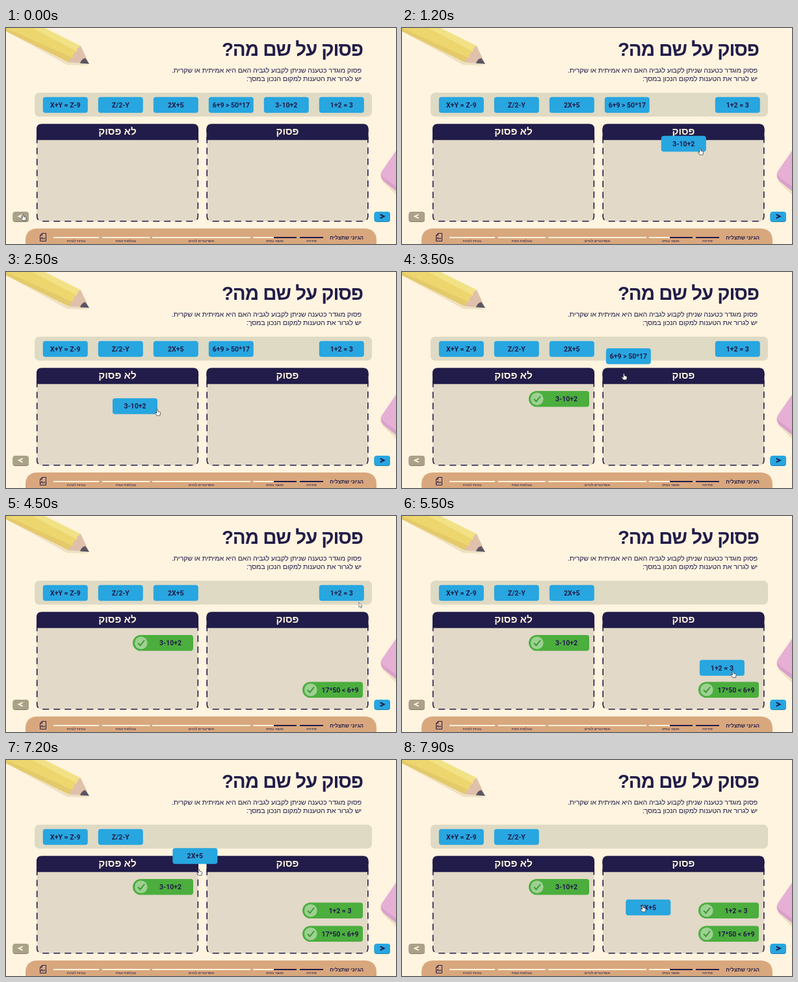
An HTML page for the animation above (8000 ms loop, 600 by 334 pixels).

```html
<!DOCTYPE html>
<html lang="he">
<head>
<meta charset="utf-8">
<title>פסוק על שם מה?</title>
<style>
  html, body { margin: 0; width: 100%; height: 100%; overflow: hidden; background: #fff4df; }
  svg { display: block; width: 100vw; height: 100vh; }
  text { fill: #211c49; font-family: "Liberation Sans", Arial, sans-serif; direction: rtl; }
  .mid { text-anchor: middle; }
  .title { font-size: 29.5px; font-weight: 700; letter-spacing: -1.07px; }
  .para { font-size: 10.8px; letter-spacing: -.17px; }
  .head { font-size: 15.2px; font-weight: 700; fill: #fff4df; }
  .course { font-size: 8px; font-weight: 700; }
  .step { font-size: 5.6px; }
  .sum { font: 600 10.5px Roboto, "Open Sans", sans-serif; direction: ltr; text-anchor: middle; }
  .icon { font-size: 6px; }
  .bar { stroke: #fff4df; stroke-width: 2.2; }
  .dark { stroke: #211c49; }
</style>
</head>
<body>
<svg viewBox="0 0 600 334" preserveAspectRatio="none">
  <rect width="600" height="334" fill="#fff4df"/>

  <!-- pencil -->
  <path d="M0 5L94 57L126 58L100 43L0 0Z" fill="#eee0c3"/>
  <path d="M0 0H59L115 28L97 53L0 5Z" fill="#edd66e"/>
  <path d="M40 0H59L115 28L109 36Z" fill="#f2e285"/>
  <path d="M0 0L102 46L97 53L0 5Z" fill="#e4ca6a"/>
  <path d="M115 28L128 55.500L97 53Q98 47 103 45Q104 38 109 36Q109 30 115 28Z" fill="#dfc1ab"/>
  <path d="M122 46.500L128 55.500L114 54.500Q116 48 122 46.500Z" fill="#5b5662"/>

  <!-- eraser -->
  <path d="M600 196L579 228Q576 236 583 241L600 258Z" fill="#eee0c3"/>
  <path d="M600 190L578 222Q574 230 581 237L600 252Z" fill="#d9a0cc"/>
  <path d="M600 190L579 221Q575 227 581 231L600 245Z" fill="#e6b0d5"/>

  <text class="title" x="549" y="42.500">פסוק על שם מה?</text>
  <text class="para" x="547" y="69">פסוק מוגדר כטענה שניתן לקבוע לגביה האם היא אמיתית או שקרית.</text>
  <text class="para" x="547" y="81.500">יש לגרור את הטענות למקום הנכון במסך:</text>

  <rect x="44" y="100" width="519" height="37" rx="7" fill="#dfdac4"/>
  <path d="M30 334V329Q30 310 49 310H551Q570 310 570 329V334Z" fill="#d9a77d"/>
  <text class="course" x="550" y="326.500">הגיוני שתצליח</text>
  <path d="M55.500 317.500H61.500V329.500H52.500V320.500ZV320.500H52.500" fill="none" stroke="#211c49"/>
  <text x="57" y="327" class="sum icon">A+</text>

  <g id="scene"></g>
  <g id="chips"></g>
  <g id="cursor">
    <path id="hand" d="M-1.800 -4.500Q-.8 -5.500 0 -4.400L.3 -1.500L3 -.8Q4.200 -.4 4.100 .8L3.400 4.800H-1.300L-4 1.200Q-4 -.1 -2.600 .4L-1.500 1.300Z" fill="#fff" stroke="#39363f" stroke-width=".8"/>
    <path id="pointer" d="M-2 -4.500V3.200L-.2 1.600L1 4.300L2.200 3.700L1.100 1.200H3.300Z" fill="#fff" stroke="#55525a" stroke-width=".7"/>
  </g>
</svg>
<script>
const LOOP = 8000, TICK = 100, LAG = 100;
const INK = '#211c49', CREAM = '#fff4df', BLUE = '#27a6e0';
const $ = id => document.getElementById(id);

function add(parent, tag, attrs, text) {
  const el = document.createElementNS('http://www.w3.org/2000/svg', tag);
  for (const k in attrs) el.setAttribute(k, attrs[k]);
  if (text) el.textContent = text;
  return parent.appendChild(el);
}
function place(el, x, y) { el.setAttribute('transform', `translate(${x} ${y})`); }
function show(el, on) { el.setAttribute('visibility', on ? 'visible' : 'hidden'); }
function group(parent, x, y) {
  const g = add(parent, 'g', {});
  place(g, x, y);
  return g;
}

function panel(x, label) {
  const g = group($('scene'), x, 148.3);
  add(g, 'rect', { x: .7, y: 2, width: 247.6, height: 148.5, rx: 7, fill: '#e2d9c8',
    stroke: INK, 'stroke-width': 1.6, 'stroke-dasharray': '10 7' });
  add(g, 'path', { d: 'M0 25V8Q0 0 8 0H241Q249 0 249 8V25Z', fill: INK });
  add(g, 'text', { class: 'head mid', x: 124.5, y: 16.5 }, label);
}
panel(47, 'לא פסוק');
panel(308.5, 'פסוק');

function pageButton(x, fill, edge, ink, dir) {
  const g = group($('scene'), x, 284);
  const box = { width: 24.5, height: 15, rx: 4 };
  add(g, 'rect', { ...box, y: 1, fill: edge });
  add(g, 'rect', { ...box, fill });
  add(g, 'path', { d: `M${12.2 - 3 * dir} 4.300l${6 * dir} 2.900l${-6 * dir} 2.900`,
    fill: 'none', stroke: ink, 'stroke-width': 1.9 });
}
pageButton(10.5, '#aaa288', '#827b64', CREAM, -1);
pageButton(566.5, BLUE, '#1b7fb2', INK, 1);

// Progress runs right to left; everything right of DONE is complete.
const DONE = 412;
function step(from, to, label) {
  const bar = (a, cls) => a < to && add($('scene'), 'path', { class: cls, d: `M${a} 324H${to}` });
  bar(from, 'bar');
  bar(Math.max(from, DONE), 'bar dark');
  add($('scene'), 'text', { class: 'step mid', x: (from + to) / 2, y: 331 }, label);
}
step(452, 488, 'פתיחה');
step(380, 447, 'מושגי בסיס');
step(225, 376, 'אופרטורים לוגיים');
step(148, 221, 'טבלאות אמת');
step(73, 143, 'בעיות לוגיות');

// Stops of the cursor: time, x, y.
const route = [
  [0, 27, 293], [1000, 455, 128], [1100, 457, 188], [1700, 490, 233], [2000, 187, 214],
  [2700, 245, 218], [3300, 335, 124], [3800, 355, 232], [4000, 440, 240], [4500, 545, 138],
  [4700, 535, 124], [5500, 510, 245], [6600, 248, 129], [6800, 250, 126], [7700, 364, 240],
  [7900, 371, 230]
];

function cursorAt(t) {
  const n = route.findIndex(stop => stop[0] > t);
  if (n < 0) return route[route.length - 1].slice(1);
  const [a, b] = [route[n - 1], route[n]];
  const u = (t - a[0]) / (b[0] - a[0]);
  const e = u * u * (3 - 2 * u);
  return [1, 2].map(k => a[k] + (b[k] - a[k]) * e);
}

const items = [
  { sum: 'X+Y = Z-9' },
  { sum: 'Z/2-Y' },
  { sum: '2X+5', grab: 6800, drop: LOOP },
  { sum: '6+9 > 50*17', solved: '17*50 < 6+9', grab: 3300, drop: 4100, slot: [456, 256.5] },
  { sum: '3-10+2', grab: 1000, drop: 2800, slot: [195, 184] },
  { sum: '1+2 = 3', grab: 4700, drop: 5600, slot: [456, 220.5] }
];

items.forEach((it, i) => {
  it.home = [91.3 + 85 * i, 119];
  it.chip = group($('chips'), ...it.home);
  add(it.chip, 'rect', { x: -34.5, y: -12.3, width: 69, height: 24.6, rx: 4, fill: BLUE });
  add(it.chip, 'text', { class: 'sum', y: 3.7 }, it.sum);
  if (!it.slot) return;
  it.pill = group($('chips'), ...it.slot);
  add(it.pill, 'path', { d: 'M12.300 0H89Q93 0 93 4V20.600Q93 24.600 89 24.600H12.300A12.300 12.300 0 0 1 12.300 0Z', fill: '#4bae3d' });
  add(it.pill, 'circle', { cx: 12.8, cy: 12.3, r: 9.8, fill: '#9dd192' });
  add(it.pill, 'path', { d: 'M8 12.500L11.500 16.200L18 8', fill: 'none', stroke: '#3f9a35', 'stroke-width': 2 });
  add(it.pill, 'text', { class: 'sum', x: 58, y: 16 }, it.solved || it.sum);
});

// A dragged chip trails the cursor, keeping the offset it was grabbed with.
function chipAt({ home, grab }, t) {
  if (!(t - LAG > grab)) return home;
  const from = cursorAt(grab), now = cursorAt(t - LAG);
  return home.map((h, k) => h + now[k] - from[k]);
}

function draw(t) {
  for (const it of items) {
    const dropped = t >= it.drop;
    place(it.chip, ...chipAt(it, t));
    show(it.chip, !dropped);
    if (it.pill) show(it.pill, dropped);
  }
  place($('cursor'), ...cursorAt(t));
  const onButton = t < 200;
  const onChip = items.some(it => t >= it.grab - 150 && t < it.drop);
  show($('hand'), onButton || onChip);
  show($('pointer'), !onButton && !onChip);
}

const start = performance.now();
function frame() {
  const t = (performance.now() - start) % LOOP;
  draw(Math.floor(t / TICK) * TICK);
  requestAnimationFrame(frame);
}
frame();
</script>
</body>
</html>
```
